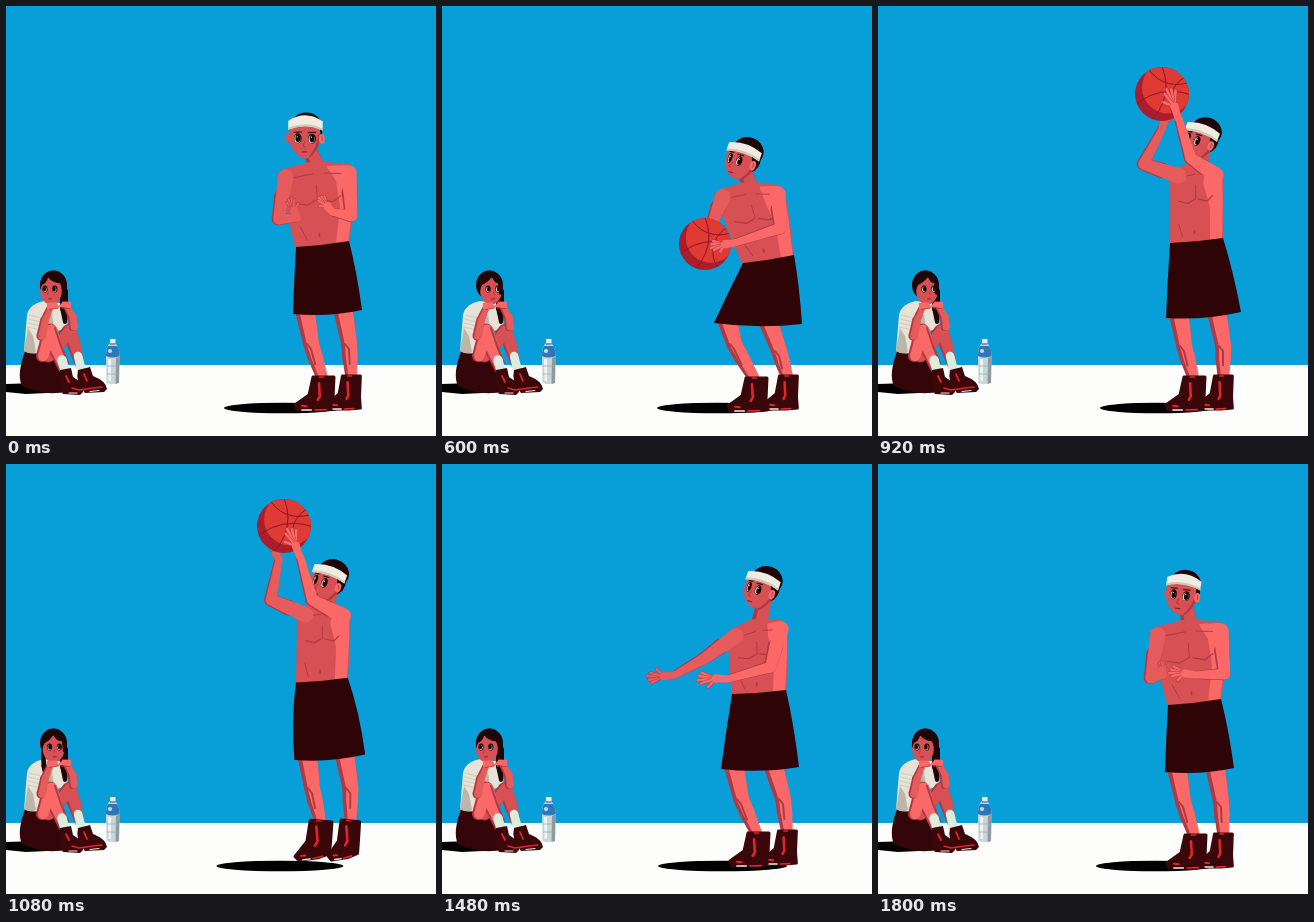
These frames come from a looping animation (430 by 430 pixels, 1880 ms). An HTML page with a canvas:

```html
<!DOCTYPE html>
<html lang="en">
<head>
<meta charset="utf-8">
<title>Jump shot</title>
<style>
  html, body { margin: 0; width: 100%; height: 100%; overflow: hidden; background: #089fd8; }
  canvas { display: block; width: 100vw; height: 100vh; }
</style>
</head>
<body>
<canvas id="stage"></canvas>
<script>
const SIZE = 430, LOOP = 1880, FIRST = 120, STEP = 80;
const canvas = document.getElementById('stage');
const dpr = window.devicePixelRatio || 1;
canvas.width = canvas.height = SIZE * dpr;
const c = canvas.getContext('2d');

const SKY = '#089fd8', FLOOR = '#fdfdfb', LIT = '#fa6968', FAR = '#e65b5b', MID = '#d75054', SHADE = '#b03a44',
      CLOTH = '#2e0407', SHOE = '#3a070a', RED = '#e0262a', HAIR = '#200507', BAND = '#f0ece1', INK = '#1a0507';

// Each joint row is x, y pairs; head is x, y, tilt, turn.
const ready = {
  head: [299, 131, .02, -.05], sh: [279, 171, 342, 167], waist: [291, 241, 342, 236],
  armL: [272, 213, 291, 212, 284, 193], armR: [345, 210, 326, 206, 314, 191],
  hem: [287, 307, 356, 304], legL: [299, 304, 305, 338, 317, 376], legR: [337, 302, 343, 338, 345, 375],
  air: [0], shadow: [218, 336], girl: [-1]
};
const POSES = [
  ready,
  { ...ready, head: [298, 131, .02, -.12], armL: [272, 213, 290, 213, 282, 194],
    armR: [345, 210, 324, 207, 317, 189], girl: [0] },
  { head: [299, 154, .33, -1], sh: [280, 191, 335, 188], waist: [302, 257, 351, 250],
    armL: [271, 214, 262, 228, 258, 240], armR: [338, 222, 292, 237, 269, 240],
    hem: [272, 316, 360, 318], legL: [285, 313, 292, 338, 314, 377], legR: [326, 314, 337, 345, 346, 375],
    air: [0], shadow: [215, 336], girl: [1] },
  { head: [321, 134, .35, -1], sh: [300, 170, 337, 169], waist: [293, 237, 344, 233],
    armL: [265, 158, 284, 122, 290, 106], armR: [312, 152, 300, 112, 291, 83],
    hem: [288, 311, 363, 306], legL: [301, 308, 306, 340, 316, 376], legR: [339, 306, 345, 340, 345, 375],
    air: [0], shadow: [222, 336], girl: [1] },
  { head: [319, 88, .33, -1], sh: [297, 115, 335, 120], waist: [287, 184, 335, 181],
    armL: [263, 95, 251, 44, 222, 36], armR: [294, 106, 282, 57, 270, 31],
    hem: [289, 265, 352, 262], legL: [302, 262, 306, 295, 312, 332], legR: [338, 260, 343, 295, 342, 333],
    air: [1], shadow: [189, 340], girl: [-1] },
  { head: [318, 125, .33, -1], sh: [293, 172, 338, 165], waist: [291, 230, 343, 227],
    armL: [261, 195, 232, 211, 206, 214], armR: [328, 203, 285, 215, 256, 214],
    hem: [279, 304, 357, 303], legL: [292, 302, 299, 335, 316, 374], legR: [331, 300, 341, 335, 345, 372],
    air: [0], shadow: [216, 345], girl: [-1] },
  { ...ready, head: [304, 130, .15, -.35], armL: [272, 214, 285, 211, 283, 198],
    armR: [346, 210, 317, 211, 292, 207] }
];
// Position along POSES for each step of the loop.
const TRACK = [0, .5, .5, .5, 1, 1.35, 1.8, 2, 2.05, 2.2, 2.65, 3, 3.06, 3.35, 3.75, 3.97, 4,
               4.55, 5, 5.25, 5.55, 5.85, 6];
// Ball x, y, radius, starting at step 4.
const BALL_FROM = 4;
const BALL = [[409, 185, 43], [352, 202, 35], [298, 224, 29], [263, 238, 26], [262, 235, 26], [264, 212, 26],
              [274, 141, 26], [284, 88, 27], [284, 84, 27], [278, 62, 27], [246, 26, 26], [128, 2, 25]];

const lerp = (a, b, f) => a + (b - a) * f;
const mixRow = (a, b, f) => a.map((v, i) => lerp(v, b[i], f));
function poseAt(u) {
  const i = Math.min(Math.floor(u), POSES.length - 2), a = POSES[i], b = POSES[i + 1], out = {};
  for (const k in a) out[k] = mixRow(a[k], b[k], u - i);
  return out;
}

function poly(col, p, round = 0) {
  c.beginPath();
  for (let i = 0; i < p.length; i += 2) c.lineTo(p[i], p[i + 1]);
  c.closePath();
  c.fillStyle = col;
  c.fill();
  if (round) { c.strokeStyle = col; c.lineWidth = round; c.lineJoin = 'round'; c.stroke(); }
}
function oval(col, x, y, rx, ry = rx) {
  c.beginPath();
  c.ellipse(x, y, rx, ry, 0, 0, 7);
  c.fillStyle = col;
  c.fill();
}
function line(col, w, p) {
  c.beginPath();
  for (let i = 0; i < p.length; i += 2) c.lineTo(p[i], p[i + 1]);
  c.strokeStyle = col;
  c.lineWidth = w;
  c.lineCap = c.lineJoin = 'round';
  c.stroke();
}
function shape(col, d) {
  c.fillStyle = col;
  c.fill(new Path2D(d));
}
function tube(col, p, w, dx = 0, k = 1) {
  for (let i = 0; i < w.length; i++) {
    const x = p[2 * i] + dx, y = p[2 * i + 1], r = w[i] * k / 2;
    oval(col, x, y, r);
    if (i + 1 === w.length) break;
    const X = p[2 * i + 2] + dx, Y = p[2 * i + 3], R = w[i + 1] * k / 2;
    const a = Math.atan2(Y - y, X - x), s = Math.sin(a), q = Math.cos(a);
    poly(col, [x - s * r, y + q * r, X - s * R, Y + q * R, X + s * R, Y - q * R, x + s * r, y - q * r]);
  }
}
function limb(col, p, w, dx = 1.2, k = .86) {
  tube(SHADE, p, w);
  tube(col, p, w, dx, k);
}

function hand(col, wx, wy, tx, ty, side) {
  const a = Math.atan2(ty - wy, tx - wx), len = Math.hypot(tx - wx, ty - wy);
  const px = wx + Math.cos(a) * len * .4, py = wy + Math.sin(a) * len * .4;
  const finger = (turn, reach) => {
    const p = [px, py, px + Math.cos(a + turn) * reach, py + Math.sin(a + turn) * reach];
    line(SHADE, 3.4, p);
    line(col, 2.5, p);
  };
  tube(col, [wx, wy, px, py], [7, 8]);
  finger(side * .9, len * .38);
  [-.38, -.12, .13, .36].forEach((t, i) => finger(t * side, len * (.52 + .05 * (i % 3))));
  oval(col, px, py, 3.8);
}
function arm(col, [x, y], a, side) {
  const mx = lerp(x, a[0], .45), my = lerp(y, a[1], .45);
  tube(SHADE, [mx, my, ...a.slice(0, 4)], [15.5, 12.5, 8]);
  tube(col, [x, y, ...a.slice(0, 4)], [17, 12, 7.5], .8, .92);
  hand(col, a[2], a[3], a[4], a[5], side);
}

const GROUND = [-10, -5, 11, -5, 10, 16, 11, 27, -2, 28, -26, 28, -28, 23, -14, 13];
const HANG = [-11, -3, 12, 2, 10, 18, 5, 33, -4, 43, -14, 50, -21, 48, -13, 24];
function shoe(x, y, air, wide) {
  const p = mixRow(GROUND, HANG, air).map((v, i) => i % 2 ? y + v : x + v * wide);
  const at = (i, j, f) => [lerp(p[2 * i], p[2 * j], f), lerp(p[2 * i + 1], p[2 * j + 1], f)];
  poly(SHOE, p, 3);
  line('#f4e8e4', 1.3, [...at(5, 4, .2), ...at(5, 4, .6)]);
  line(RED, 1.6, [...at(5, 4, .75), ...at(4, 3, .4)]);
  line(RED, 2, [...at(6, 3, .18), ...at(6, 3, .3)]);
  line(RED, 2.6, [...at(0, 2, .3), ...at(7, 2, .45), ...at(7, 3, .35)]);
  line(RED, 1.4, [...at(0, 1, .3), ...at(0, 1, .5)]);
}

function ball([x, y, r]) {
  c.save();
  c.beginPath();
  c.arc(x, y, r, 0, 7);
  c.clip();
  c.fillStyle = '#aa1d2d';
  c.fillRect(x - r, y - r, 2 * r, 2 * r);
  oval('#df3a33', x + r * .22, y - r * .24, r * .96);
  c.strokeStyle = '#8c1522';
  c.lineWidth = Math.max(1, r * .035);
  const seam = (dx, dy, k) => { c.beginPath(); c.arc(x + dx * r, y + dy * r, k * r, 0, 7); c.stroke(); };
  seam(.35, 1.95, 2.05);
  seam(.55, -1.6, 1.25);
  if (r < 40) { seam(-1.6, -.3, 1.75); seam(1.35, .3, 1.05); }
  c.restore();
}

function head([x, y, tilt, t]) {
  const s = -t;
  c.save();
  c.translate(x, y);
  c.rotate(tilt);
  oval(HAIR, 1 + 3 * s, -11, 15.5, 13.5);
  if (s > .2) oval(HAIR, 9 + 2 * s, -3, 8, 12);
  oval(MID, -17 + 7 * s, 1, 3, 5);
  shape(MID, `M-15-12L-15.5 4Q-14 13-5 ${20 - s}Q1 ${23 - 2 * s} 6 ${20 - 2 * s}Q13 13 15 4L15-12Z`);
  // side of the face in shade
  shape(SHADE, 'M6 20Q13 13 15 4L15-4L13-2Q13 9 4 20Z');
  shape(HAIR, `M${15 - 7 * s}-10L17-10L17 3L${16 - 4 * s} 1Z`);
  oval(LIT, 17 - 4 * s, 1.5, 3, 4.8);
  line(SHADE, .9, [17 - 4 * s, -1, 17.5 - 4 * s, 3]);
  const eye = (ex, rx) => {
    oval(INK, ex, 1.5, rx, 5);
    oval('#eadbc8', ex - .4, 2, rx - .9, 4);
    oval(INK, ex + .4 * s, 1.5, rx * .6, 3.8);
    oval('#fff', ex - .5, 0, .6);
    line(INK, 1.1, [ex - rx, -4.6, ex + rx - .5, -5]);
  };
  eye(-7 - 4 * s, 4 - 1.8 * s);
  eye(7.5 - 9 * s, 4 - .9 * s);
  line(SHADE, 1.1, [-7 * s, 5, -1.4 - 8 * s, 9.5, 1 - 8 * s, 10]);
  line('#8e2630', 1.3, [-2 - 6 * s, 15, 2 - 6 * s, 14.8]);
  const band = (col, end, mid) =>
    shape(col, `M-17 ${end}Q0 ${mid} 17.500 ${end}L17.500 ${2.5 * s - 7}Q0 ${5 * s - 15}-17 ${2.5 * s - 7}Z`);
  band(BAND, 3 * s - 16, 8 * s - 28);
  band('#cfc9ba', 2.5 * s - 9, 5 * s - 17);
  c.restore();
}

function leg(p) {
  const calf = [lerp(p[2], p[4], .35), lerp(p[3], p[5], .35)];
  limb(LIT, [p[0], p[1], p[2], p[3], ...calf, p[4], p[5]], [20, 15.5, 15, 10], 2, .78);
  line(SHADE, 2, [p[2] - 4, p[3], p[2], p[3] + 5, calf[0], calf[1] + 7]);
}

function torso(p) {
  const [lx, ly, rx, ry] = p.sh, [wx, wy, vx, vy] = p.waist;
  const nx = (lx + rx) / 2 + 1, ny = (ly + ry) / 2 - 13;
  const sideL = [lerp(lx, wx, .4) - 4, lerp(ly, wy, .4)], sideR = [lerp(rx, vx, .4) + 5, lerp(ry, vy, .4)];
  tube(SHADE, [p.head[0] + 4, p.head[1] + 12, nx, ny + 6], [14, 16]);
  tube(MID, [p.head[0] + 6, p.head[1] + 13, nx + 2, ny + 6], [10, 13]);
  poly(MID, [nx - 7, ny + 1, lx - 1, ly - 7, lx - 7, ly - 2, ...sideL,
             wx, wy + 3, vx, vy + 3, ...sideR, rx + 7, ry, rx + 1, ry - 8, nx + 8, ny + 1], 2);
  poly(LIT, [nx + 9, ny + 4, rx, ry - 8, rx + 7, ry, ...sideR, vx, vy + 2, vx - 12, vy + 2,
             sideR[0] - 13, sideR[1] + 6, rx - 12, ry + 8]);
  // chest, ribs and navel
  const at = (f, g) => [lerp(lerp(lx, rx, f), lerp(wx, vx, f), g), lerp(lerp(ly, ry, f), lerp(wy, vy, f), g)];
  line(SHADE, 1, [...at(.12, .02), ...at(.45, -.02)]);
  line(SHADE, 1, [...at(.62, -.02), ...at(.9, 0)]);
  line(SHADE, 1.2, [...at(.08, .38), ...at(.3, .42), ...at(.46, .36)]);
  line(SHADE, 1.2, [...at(.54, .36), ...at(.75, .4), ...at(.88, .32)]);
  line(SHADE, 1, [...at(.48, .15), ...at(.48, .36)]);
  line(SHADE, 1.6, [...at(.46, .84), ...at(.46, .88)]);
  line(SHADE, 1, [...at(.12, .72), ...at(.22, .92)]);
}

function shorts(p) {
  const [a, b, d, e] = p.waist, [l, m, r, s] = p.hem, puff = 5 * p.air[0];
  c.beginPath();
  c.moveTo(a - 1, b);
  c.quadraticCurveTo((a + d) / 2, (b + e) / 2 + 1, d + 1, e - 1);
  c.quadraticCurveTo(lerp(d, r, .5) + 2 + puff, lerp(e, s, .45), r, s);
  c.quadraticCurveTo((l + r) / 2, (m + s) / 2 + 6, l, m + 1);
  c.quadraticCurveTo(lerp(a, l, .5) - 1 - 2 * puff, lerp(b, m, .5), a - 1, b);
  poly.call(null, CLOTH, []);
  c.restore && 0;
}

function drawShorts(p) {
  const [a, b, d, e] = p.waist, [l, m, r, s] = p.hem, puff = 5 * p.air[0];
  shape(CLOTH, `M${a - 1} ${b}Q${(a + d) / 2} ${(b + e) / 2 + 1} ${d + 1} ${e - 1}
    Q${lerp(d, r, .5) + 2 + puff} ${lerp(e, s, .45)} ${r} ${s}
    Q${(l + r) / 2} ${(m + s) / 2 + 6} ${l} ${m + 1}
    Q${lerp(a, l, .5) - 1 - 2 * puff} ${lerp(b, m, .5)} ${a - 1} ${b}Z`);
}

function player(p, held) {
  const [x0, x1] = p.shadow;
  oval('#000', (x0 + x1) / 2, 402, (x1 - x0) / 2, 5.3);
  leg(p.legL);
  leg(p.legR);
  shoe(p.legL[4], p.legL[5], p.air[0], 1);
  shoe(p.legR[4], p.legR[5], p.air[0], .85);
  torso(p);
  drawShorts(p);
  head(p.head);
  arm(FAR, p.sh.slice(0, 2), p.armL, 1);
  if (held) ball(held);
  arm(LIT, p.sh.slice(2), p.armR, -1);
}

function girl(t) {
  shape('#000', 'M0 378L30 377L62 386L20 388L0 386Z');
  shape('#350609', 'M20 343Q10 368 16 380Q36 390 60 386L63 365L48 340Z');
  shape('#e6e2d5', 'M38 295Q23 298 21 309L18 345Q28 350 38 345L47 326L62 322L59 298Z');
  shape('#bcb6a8', 'M22 322L18 345Q24 349 30 346L27 330ZM42 310L42 321L48 322L46 308Z');
  for (let i = 0; i < 4; i++) line('#c9c4b6', .8, [23 - i * .5, 309 + i * 4, 35, 312 + i * 4]);
  // hair strands
  tube(HAIR, [58, 286, 58, 302, 59, 316], [8, 8, 4]);
  if (Math.abs(t) < .7) tube(HAIR, [37, 288, 38, 302, 39, 314], [4, 5, 2]);
  limb(MID, [42, 350, 63, 325, 69, 342, 73, 358], [13, 14, 13, 8]);
  limb(LIT, [36, 350, 44, 325, 50, 344, 57, 363], [12, 15, 14, 9]);
  line(SHADE, 2, [49, 322, 55, 340, 62, 357]);
  tube('#dcecdd', [56, 354, 59, 365], [9.5, 9]);
  tube('#dcecdd', [72, 350, 75, 362], [8.5, 9]);
  shape(SHOE, 'M54 364L65 362L67 371Q78 377 77 386L74 389L57 388Q51 377 54 364ZM72 364L84 361L87 370Q100 375 101 383L98 386L79 387Q69 376 72 364Z');
  line(RED, 1.8, [60, 370, 63, 376]);
  line(RED, 1.8, [78, 368, 81, 375]);
  line(RED, 1.4, [66, 382, 73, 384, 87, 382, 96, 381]);
  line('#f2e4e0', 1.1, [63, 387, 71, 387]);
  line('#f2e4e0', 1.1, [84, 385.5, 93, 384.5]);
  // head
  const fx = 47 + 2 * t, ex = 47.5 + 3.5 * t, edge = 36 + 2 * t;
  oval(HAIR, 47.5, 279, 13.5, 14.5);
  oval(MID, fx, 285, 10.8, 13.5);
  shape(HAIR, `M${edge} 284Q33 266 47 264.500Q61 266 61.500 290L57 288L56 277Q${50 + 3 * t} 278 ${46 + 4 * t} 271Q${43 + 2 * t} 277 ${edge + 2} 279Z`);
  for (const x of [ex - 5, ex + 4.8]) {
    oval(INK, x, 283, 2.6, 3.4);
    oval('#e9dcd2', x - .2, 283.4, 1.8, 2.6);
    oval(INK, x + t * .5, 283, 1.5, 2.5);
  }
  line(SHADE, 1, [ex - .5 + t, 286, ex - .8 + t * 2, 289]);
  line('#8e2630', 1.1, [ex - 1.5, 293, ex + 1.5, 292.8]);
  // chin resting on both hands
  limb(FAR, [35, 330, 38, 315, 43, 303], [9, 8, 6]);
  limb(FAR, [67, 321, 66, 311, 61, 302], [8, 8, 6]);
  for (let i = 0; i < 3; i++) {
    line(LIT, 2.4, [42, 302 - i * 2, 52 - i, 301 - i * 1.6]);
    line(LIT, 2.4, [64, 301 - i * 2, 54 + i * 1.5, 300 - i * 1.6]);
  }
  line(SHADE, .9, [43, 303.5, 52, 302]);
  line(SHADE, .9, [55, 302, 64, 302.5]);
}

function bottle() {
  shape('#c9d5d8', 'M104 337Q99.500 341 100 350L100.500 377Q106 379 113 377L113.500 350Q113.500 341 109 337Z');
  shape('#2a78ba', 'M102 340Q100 343 100 350Q106 353 113.500 350Q113.500 343 111 340Z');
  shape('#8d9a9e', 'M110 352L113.500 350L113 377L109.500 378Z');
  shape('#eef3f3', 'M102 353L105 353L105 375L102.500 375Z');
  oval('#b9d8ea', 104, 345, 2.2, 2);
  c.fillStyle = '#e9eeee';
  c.fillRect(104, 333, 5.5, 4);
  line('#255f91', 1, [104, 338, 109, 338]);
  line('#9aa8ab', .7, [101, 360, 113, 360]);
  line('#9aa8ab', .7, [101, 368, 113, 368]);
}

function draw(ms) {
  const n = ms < FIRST ? 0 : Math.min(TRACK.length - 1, 1 + Math.floor((ms - FIRST) / STEP));
  const p = poseAt(TRACK[n]), b = BALL[n - BALL_FROM], incoming = n < 6;
  c.setTransform(dpr, 0, 0, dpr, 0, 0);
  c.fillStyle = SKY;
  c.fillRect(0, 0, SIZE, SIZE);
  c.fillStyle = FLOOR;
  c.fillRect(0, 359, SIZE, SIZE - 359);
  girl(p.girl[0]);
  bottle();
  player(p, incoming ? null : b);
  if (b && incoming) ball(b);
}

const start = performance.now();
function tick() {
  draw((performance.now() - start) % LOOP);
  requestAnimationFrame(tick);
}
tick();
</script>
</body>
</html>
```
